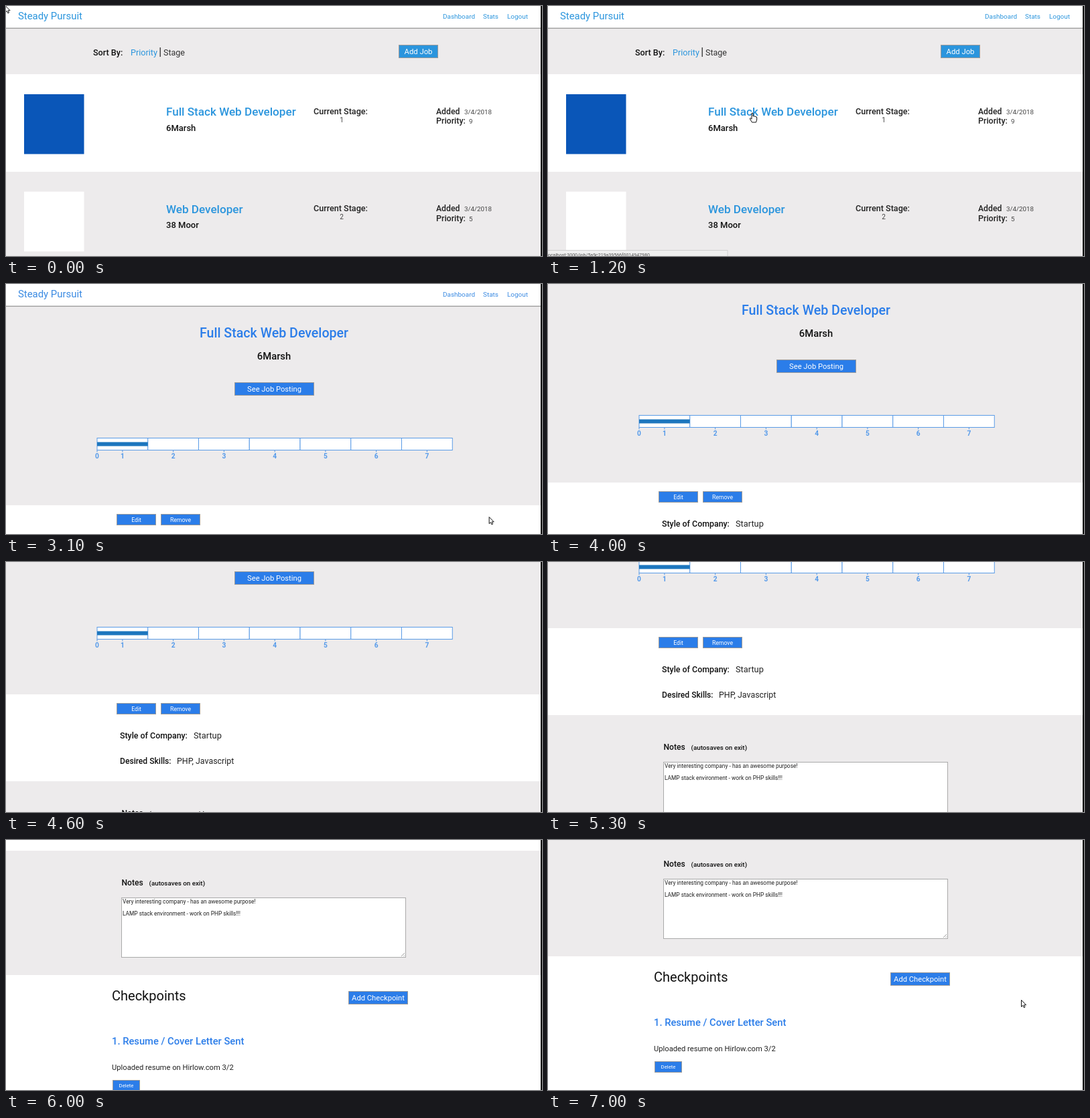
An HTML page for the animation above (7.1 s loop, 800 by 374 pixels).

```html
<!DOCTYPE html>
<html lang="en">
<head>
<meta charset="utf-8">
<title>Job tracker</title>
<style>
  html, body { margin: 0; width: 100%; height: 100%; overflow: hidden; background: #fff; }
  svg { display: block; width: 100%; height: 100%; font-family: Roboto, "Open Sans", sans-serif; }
</style>
</head>
<body>
<svg id="stage" viewBox="0 0 800 374" xmlns="http://www.w3.org/2000/svg"></svg>
<script>
const LOOP = 7100, STEP = 100;
const BLUE = '#2b7de9', SKY = '#2b95dd', GREY = '#edebec', INK = '#111', SOFT = '#444', LINE = '#5a9be6';
const stage = document.getElementById('stage');

function add(parent, tag, attrs, content) {
  const node = document.createElementNS('http://www.w3.org/2000/svg', tag);
  for (const key in attrs) node.setAttribute(key, attrs[key]);
  if (content !== undefined) node.textContent = content;
  parent.appendChild(node);
  return node;
}
const group = parent => add(parent, 'g', {});
const rect = (parent, x, y, width, height, fill, extra) =>
  add(parent, 'rect', { x, y, width, height, fill, ...extra });
const text = (parent, x, y, size, content, fill = INK, weight = 400, anchor = 'start') =>
  add(parent, 'text', { x, y, fill, 'font-size': size, 'font-weight': weight, 'text-anchor': anchor }, content);

function button(parent, x, y, width, height, label, size, fill = BLUE) {
  rect(parent, x + .5, y + .5, width - 1, height - 1, fill, { stroke: '#9a9a9a' });
  text(parent, x + width / 2, y + height / 2 + size * .36, size, label, '#fff', 400, 'middle');
}

function header(parent, fill) {
  rect(parent, 0, 0, 800, 33, '#fff');
  rect(parent, 0, 32.7, 800, 1, '#777');
  text(parent, 18, 20, 14.9, 'Steady Pursuit', fill);
  text(parent, 652, 18.5, 9.95, 'Dashboard', fill);
  text(parent, 712, 18.5, 9.95, 'Stats', fill);
  text(parent, 748, 18.5, 9.95, 'Logout', fill);
}

function jobRow(parent, y, logo, title, company, level, priority) {
  rect(parent, 27, y + 30, 89.5, 89.5, logo);
  text(parent, 239, y + 62, 17.1, title, SKY, 500);
  text(parent, 239, y + 84.5, 13, company, INK, 500);
  text(parent, 459, y + 59.5, 12.6, 'Current Stage:', '#222', 500);
  text(parent, 501, y + 71.5, 10, level, SOFT, 400, 'middle');
  text(parent, 642, y + 59.5, 12.2, 'Added', '#222', 500);
  text(parent, 684, y + 59.5, 9.8, '3/4/2018', SOFT);
  text(parent, 642, y + 74, 12.5, 'Priority:', '#222', 500);
  text(parent, 691, y + 74, 9.8, priority, SOFT);
}

// Job list
const list = group(stage);
rect(list, 0, 0, 800, 374, '#fff');
header(list, SKY);
rect(list, 0, 34, 800, 68, GREY);
rect(list, 0, 248, 800, 126, GREY);
text(list, 130, 74, 12.6, 'Sort By:', INK, 500);
text(list, 186, 74, 12.6, 'Priority', SKY);
rect(list, 229.6, 62, 1.2, 14, '#222');
text(list, 235, 74, 12.5, 'Stage', '#333');
button(list, 586, 58, 59, 20, 'Add Job', 11.3, SKY);
jobRow(list, 102, '#0a56b8', 'Full Stack Web Developer', '6Marsh', 1, 9);
jobRow(list, 247.7, '#fff', 'Web Developer', '38 Moor', 2, 5);

// Job detail, a tall page that scrolls
const detail = group(stage);
rect(detail, 0, 0, 800, 860, '#fff');
header(detail, '#3a8ae2');
rect(detail, 0, 34, 800, 297, GREY);
text(detail, 400, 79.7, 19.6, 'Full Stack Web Developer', BLUE, 500, 'middle');
text(detail, 400, 113.2, 14.8, '6Marsh', INK, 500, 'middle');
button(detail, 341, 147, 119, 20, 'See Job Posting', 11.2);

const CHART_X = 136, CELL = 75.75;
for (let i = 0; i < 7; i++)
  rect(detail, CHART_X + i * CELL, 230.5, CELL, 18, '#fff', { stroke: LINE });
const bar = rect(detail, CHART_X, 236.5, 0, 6, '#1c76be');
const axis = group(detail);
for (let i = 0; i < 8; i++) {
  const x = i ? CHART_X + (i - .5) * CELL : CHART_X;
  rect(axis, x - .5, 248.5, 1, 3, LINE);
  text(axis, x, 261, 10.2, i, '#559aea', 700, 'middle');
}

button(detail, 165, 344, 59, 17, 'Edit', 8.7);
button(detail, 231, 344, 59, 17, 'Remove', 8.7);
text(detail, 170, 396.5, 12.4, 'Style of Company:', INK, 500);
text(detail, 280, 396.5, 12.8, 'Startup', '#222');
text(detail, 170, 434.5, 12.1, 'Desired Skills:', INK, 500);
text(detail, 255, 434.5, 12.4, 'PHP, Javascript', '#222');

rect(detail, 0, 461, 800, 186, GREY);
text(detail, 172.5, 513, 12.1, 'Notes', INK, 500);
text(detail, 213.5, 512.5, 9.8, '(autosaves on exit)', INK, 500);
rect(detail, 172.5, 531.5, 424, 89, '#fff', { stroke: '#aaa' });
add(detail, 'path', { d: 'M590 619l5-5M593.5 619l1.5-1.5', stroke: '#888', 'stroke-width': .8 });
text(detail, 174, 540, 8.4, 'Very interesting company - has an awesome purpose!', '#222');
text(detail, 174, 558, 8.4, 'LAMP stack environment - work on PHP skills!!!', '#222');

text(detail, 158, 684.5, 20, 'Checkpoints', INK);
button(detail, 511, 671, 89, 20, 'Add Checkpoint', 11.2);
text(detail, 158, 751, 14.75, '1. Resume / Cover Letter Sent', BLUE, 500);
text(detail, 158, 789, 11.2, 'Uploaded resume on Hirlow.com 3/2', '#222');
button(detail, 159, 804, 41, 17, 'Delete', 7.8);

// Browser status line
const status = group(stage);
rect(status, -1, 365.5, 269, 12, '#efefef', { stroke: '#d0d0d0' });
text(status, -2, 375, 7, 'localhost:3000/job/5a9c219a39566f0014947980', '#555');

// Pointers, with the hot spot at the origin
const outline = { fill: '#fff', stroke: '#111', 'stroke-width': 1, 'stroke-linejoin': 'round' };
const arrow = add(stage, 'path', { ...outline, d: 'M.5 .5V10.5L2.8 8.4L4.4 11.8L6 11L4.5 7.8H7.6Z' });
const hand = add(stage, 'path', { ...outline,
  d: 'M-1 1Q0 0 1 1V5.5Q2 4.6 3 5.7Q4 5 5 6.2Q6.5 5.8 6.7 7.5V10.5L5.5 14.5H-.5L-3.6 9.4Q-3.6 7.7-2.3 8.4L-1 9.7Z' });

rect(stage, 798, 0, 2, 374, '#111');

// Keyframes are [time, value, ...], joined by straight lines
const SCROLL = [[3700, 0], [4000, 34], [4600, 133], [5300, 232], [5600, 335], [6100, 473]];
const POINTER_IN = [[0, -1.5, -1], [100, 278, 170], [200, 278, 170], [1000, 305, 159.5]];
const POINTER_OUT = [[2400, 305, 159.5], [3200, 780, 375]];
const POINTER_BACK = [[6800, 788, 290], [6900, 740, 258], [7000, 706, 239]];

function along(keys, t) {
  const next = keys.findIndex(key => key[0] > t);
  if (next < 0) return keys[keys.length - 1].slice(1);
  if (next === 0) return keys[0].slice(1);
  const a = keys[next - 1], b = keys[next], k = (t - a[0]) / (b[0] - a[0]);
  return a.slice(1).map((value, i) => value + (b[i + 1] - value) * k);
}

function easeInOut(k) {
  k = Math.min(1, Math.max(0, k));
  return k < .5 ? 4 * k ** 3 : 1 - 4 * (1 - k) ** 3;
}

const show = (node, visible) => node.setAttribute('visibility', visible ? 'visible' : 'hidden');
const move = (node, x, y) => node.setAttribute('transform', `translate(${x} ${y})`);

function draw(t) {
  const opened = t >= 1700;
  list.style.display = opened ? 'none' : '';
  detail.style.display = opened ? '' : 'none';
  move(detail, 0, -Math.round(along(SCROLL, t)[0]));
  bar.setAttribute('width', CELL * easeInOut((t - 1900) / 900));
  show(axis, t >= 2000);
  show(status, t >= 1100 && t < 2500);

  const path = t < 2500 ? POINTER_IN : t < 6800 ? POINTER_OUT : POINTER_BACK;
  const [x, y] = along(path, t);
  const pointing = t >= 500 && t < 2500;
  move(arrow, x, y);
  move(hand, x, y);
  show(hand, pointing);
  show(arrow, !pointing && (t < 3200 || t >= 6800));
}

const start = performance.now();
function tick() {
  const t = (performance.now() - start) % LOOP;
  draw(Math.floor(t / STEP) * STEP);
  requestAnimationFrame(tick);
}
draw(0);
requestAnimationFrame(tick);
</script>
</body>
</html>
```
